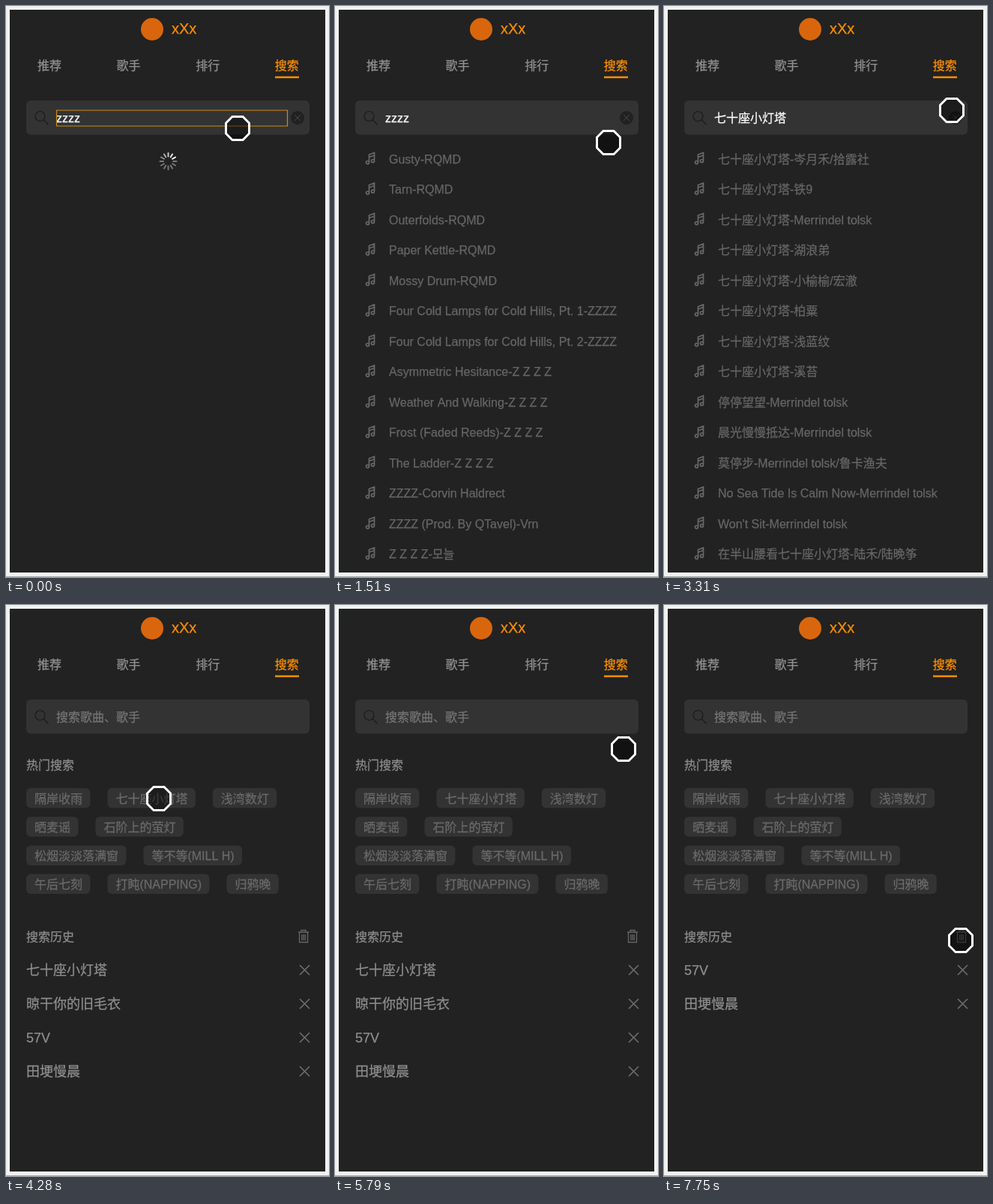
Animation of 431x761 px, one loop 8000 ms. Source, as an HTML page with a canvas:

```html
<!DOCTYPE html>
<html lang="zh">
<head>
<meta charset="utf-8">
<title>Music search</title>
<style>
  html, body { margin: 0; width: 100%; height: 100%; overflow: hidden; background: #f0f2f1; }
  canvas { display: block; }
</style>
</head>
<body>
<canvas id="stage" width="431" height="761"></canvas>
<script>
const ctx = document.getElementById('stage').getContext('2d');
const FONT = '"Liberation Sans", "Noto Sans CJK SC", "Noto Sans CJK", sans-serif';
const ORANGE = '#ff8f00';
const LOOP = 8000, ROW = 40.5;

const TYPED = 'zzzz', PICKED = '七十座小灯塔', SINGER = 'Merrindel tolsk';
const RESULTS = {
  [TYPED]: [
    ...['Quern', 'Gusty', 'Tarn', 'Outerfolds', 'Paper Kettle', 'Mossy Drum'].map(s => s + '-RQMD'),
    ...[1, 2].map(n => `Four Cold Lamps for Cold Hills, Pt. ${n}-ZZZZ`),
    ...['Asymmetric Hesitance', 'Weather And Walking', 'Frost (Faded Reeds)', 'The Ladder'].map(s => s + '-Z Z Z Z'),
    'ZZZZ-Corvin Haldrect', 'ZZZZ (Prod. By QTavel)-Vrn', 'Z Z Z Z-모늘'
  ],
  [PICKED]: [
    ...['岑月禾/拾露社', '铁9', SINGER, '湖浪弟', '小榆榆/宏澈', '柏粟', '浅蓝纹', '溪苔'].map(s => `${PICKED}-${s}`),
    `停停望望-${SINGER}`, `晨光慢慢抵达-${SINGER}`, `莫停步-${SINGER}/鲁卡渔夫`,
    `No Sea Tide Is Calm Now-${SINGER}`, `Won't Sit-${SINGER}`, `在半山腰看${PICKED}-陆禾/陆晚筝`
  ]
};
const HOT = [
  ['隔岸收雨', PICKED, '浅湾数灯'],
  ['晒麦谣', '石阶上的萤灯'],
  ['松烟淡淡落满窗', '等不等(MILL H)'],
  ['午后七刻', '打盹(NAPPING)', '归鸦晚']
];
const HISTORY = [PICKED, '晾干你的旧毛衣', '57V', '田埂慢晨'];

// Each visit: when the results load, appear and are cleared again
const SEARCHES = [
  { query: TYPED, load: 0, show: 270, clear: 1960 },
  { query: PICKED, load: 2510, show: 2830, clear: 3460 },
  { query: PICKED, load: 4680, show: 5210, clear: 5640 }
];
const REMOVALS = [6910, 7330];

// Places where the pointer stops or turns
const CLEAR = [388, 158], TAG = [204, 258], DELETE = [397, 486];
const POINTER = [
  [0, 309, 163], [420, ...CLEAR], [1130, 333, 216], [1820, ...CLEAR],
  [2210, 264, 234], [2510, ...TAG], [3310, 384, 139], [3630, 414, 129],
  [4130, ...TAG], [4680, ...TAG], [5090, 378, 166], [5210, 408, 114],
  [5640, ...CLEAR], [6370, 363, 466], [6650, ...DELETE], [7330, ...DELETE], [7750, 396, 447], [LOOP, 396, 447]
];

function ease(p) {
  p = Math.max(0, Math.min(1, p));
  return p * p * (3 - 2 * p);
}

function pointerAt(t) {
  const i = POINTER.findLastIndex(k => k[0] <= t);
  const [t0, x0, y0] = POINTER[i], [t1, x1, y1] = POINTER[i + 1];
  const p = ease((t - t0) / (t1 - t0));
  return [x0 + (x1 - x0) * p, y0 + (y1 - y0) * p].map(Math.round);
}

function text(str, x, y, color, size = 16, align = 'left') {
  ctx.font = `${size}px ${FONT}`;
  ctx.textAlign = align;
  ctx.fillStyle = ctx.strokeStyle = color;
  ctx.lineWidth = 0.25;
  ctx.fillText(str, x, y);
  ctx.strokeText(str, x, y);
}

function box(x, y, w, h, r, color) {
  ctx.fillStyle = color;
  ctx.beginPath();
  ctx.roundRect(x, y, w, h, r);
  ctx.fill();
}

function disc(x, y, r, color) {
  box(x - r, y - r, 2 * r, 2 * r, r, color);
}

function outline(path, x, y, color, width, fill) {
  const shape = new Path2D(path);
  ctx.save();
  ctx.translate(x, y);
  ctx.strokeStyle = color;
  ctx.lineWidth = width;
  if (fill) {
    ctx.fillStyle = fill;
    ctx.fill(shape);
  }
  ctx.stroke(shape);
  ctx.restore();
}

function cross(x, y, r, color, width) {
  outline(`M${-r},${-r}L${r},${r}M${r},${-r}L${-r},${r}`, x, y, color, width);
}

function ring(x, y, r) {
  return `M${x + r},${y}a${r},${r} 0 1 1 ${-2 * r},0a${r},${r} 0 1 1 ${2 * r},0`;
}

const MAGNIFIER = ring(0, 0, 6.5) + 'M4.6,4.6L11,11';
const NOTE = ring(2.5, 5, 2) + ring(9.5, 3, 2) + 'M4.5,5V-5.5L11.5,-8V3M4.5,-2L11.5,-4.5';
const TRASH = 'M-7,-5.5H7M-3,-6V-8H3V-6M-5.5,-5V8H5.5V-5M-2.2,-2.5V5.5M0,-2.5V5.5M2.2,-2.5V5.5';
const OCTAGON = 'M-7,-15.5H7L15.5,-7V7L7,15.5H-7L-15.5,7V-7Z';

function drawHeader() {
  disc(195, 31, 15, '#d9660d');
  text('xXx', 221, 37, ORANGE, 20);
  ['推荐', '歌手', '排行', '搜索'].forEach((name, i) =>
    text(name, 58 + i * 105.6, 85, i === 3 ? ORANGE : '#909090', 16, 'center'));
  box(359, 93.7, 32, 2.5, 0, ORANGE);
}

function drawSearchBox(query, focused) {
  box(27, 126, 378, 45.5, 6, '#333');
  outline(MAGNIFIER, 45.5, 147, '#1a1a1a', 1.2);
  text(query || '搜索歌曲、歌手', 67, 155, query ? '#fff' : '#757575');
  if (query) {
    disc(389, 149, 9, '#212121');
    cross(389, 149, 4, '#484848', 1);
  }
  if (focused) outline('M0,0H308V21H0Z', 67.5, 139, '#d08c10', 1.2);
}

function drawSpinner(t) {
  const head = Math.floor(t / 88 + 2.3);
  ctx.save();
  ctx.translate(216.5, 207);
  for (let i = 0; i < 12; i++) {
    const behind = (head - i + 1200) % 12;
    const shade = Math.max(120, 255 - behind * 28);
    box(-1, -12, 2, 6.5, 1, `rgb(${shade},${shade},${shade})`);
    ctx.rotate(Math.PI / 6);
  }
  ctx.restore();
}

function drawList(rows, scroll) {
  ctx.save();
  ctx.beginPath();
  ctx.rect(5, 193, 421, 562);
  ctx.clip();
  rows.forEach((row, i) => {
    const y = 203.5 + i * ROW - scroll;
    outline(NOTE, 41, y, '#686868', 1.7);
    text(row, 72, y + 6, '#666');
  });
  ctx.restore();
}

function drawHome(history) {
  text('热门搜索', 27, 219, '#8c8c8c');
  HOT.forEach((row, i) => {
    let x = 27;
    const y = 244 + i * 38.2;
    for (const tag of row) {
      ctx.font = `16px ${FONT}`;
      const w = ctx.measureText(tag).width + 21.4;
      box(x, y, w, 26.5, 6, '#333');
      text(tag, x + 11, y + 19.5, '#6a6a6a');
      x += w + 23;
    }
  });
  text('搜索历史', 27, 448, '#8c8c8c');
  outline(TRASH, 397, 441.5, '#666', 1.3);
  history.forEach((item, i) => {
    text(item, 27, 492.5 + i * 45, '#8e8e8e', 18);
    cross(398.5, 486.5 + i * 45, 6.5, '#6c6c6c', 1.7);
  });
}

function draw(t) {
  const search = SEARCHES.find(s => t >= s.load && t < s.clear);
  box(0, 0, 431, 761, 0, '#f0f2f1');
  box(0, 760, 431, 1, 0, '#aaa');
  box(5, 5, 421, 750, 0, '#222');
  drawHeader();
  drawSearchBox(search?.query, t < 850);
  if (!search) {
    drawHome(HISTORY.slice(REMOVALS.filter(at => t >= at).length));
  } else if (t < search.show) {
    drawSpinner(t);
  } else {
    const scroll = search.query === TYPED ? ROW * ease((t - 950) / 430) : 0;
    drawList(RESULTS[search.query], scroll);
  }
  outline(OCTAGON, ...pointerAt(t), '#fff', 3, 'rgba(0,0,0,.45)');
}

const begin = performance.now();
function loop() {
  draw((performance.now() - begin) % LOOP);
  requestAnimationFrame(loop);
}
loop();
</script>
</body>
</html>
```
